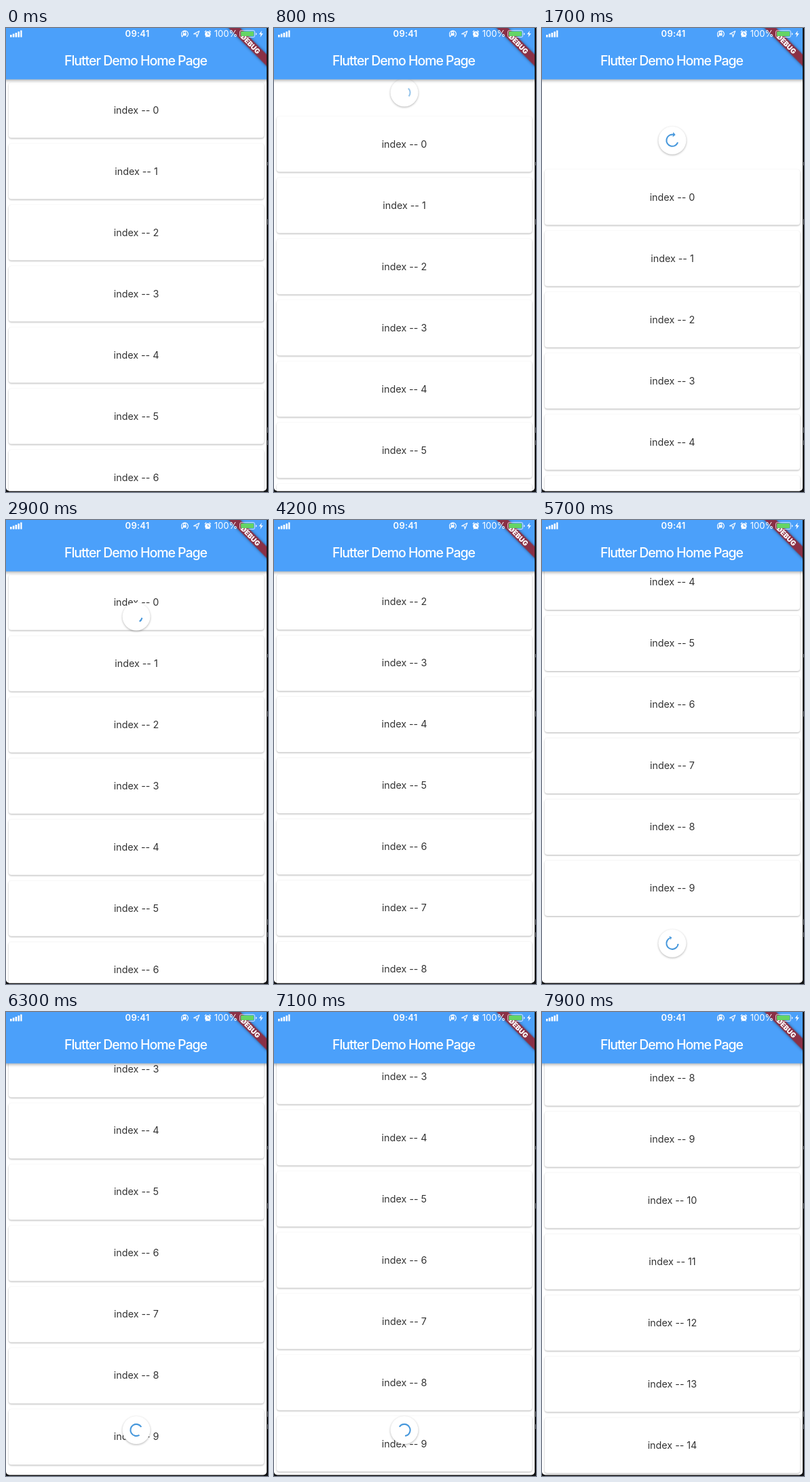
Recreate the animation shown at these times as an HTML page. Size 386 px wide and 682 px high, loop 8000 ms.

```html
<!DOCTYPE html>
<html lang="en">
<head>
<meta charset="utf-8">
<title>Pull to refresh</title>
<style>
  html, body { margin: 0; width: 100%; height: 100%; overflow: hidden; background: #121315; }
  svg { display: block; width: 386px; height: 682px; }
  text { font-family: Inter, "Open Sans", sans-serif; text-anchor: middle; font-feature-settings: "calt" 0; }
  .card rect { fill: #fff; filter: drop-shadow(0 1px 1px rgba(0,0,0,.3)); }
  .card text { font-size: 14.3px; fill: #333; }
  .bar { fill: #4ba0fa; filter: drop-shadow(0 2px 2px rgba(0,0,0,.3)); }
  .title { font-size: 19.5px; font-weight: 500; letter-spacing: -1.02px; fill: #fff; }
  .disc { fill: #fff; filter: drop-shadow(0 1px 1.5px rgba(0,0,0,.3)); }
  .band { fill: #8a3046; filter: drop-shadow(0 0 2px rgba(0,0,0,.45)); }
  .debug { font-size: 10.2px; font-weight: 900; fill: #fff; }
  .status { fill: #fff; font-size: 13px; }
  .line { fill: none; stroke: #fff; stroke-width: 1.1; }
</style>
</head>
<body>
<svg viewBox="0 0 386 682">
  <defs>
    <clipPath id="screen"><rect x="0" y="-10" width="384" height="690.5" rx="5"/></clipPath>
  </defs>
  <rect width="386" height="682" fill="#121315"/>
  <path d="M385.5 197v5M385.5 281v8M385.5 587v8M385.5 606v7" stroke="#77797c"/>
  <g clip-path="url(#screen)">
    <rect width="384" height="682" fill="#fff"/>
    <g id="list"></g>
    <g id="spinner">
      <circle class="disc" r="20.5"/>
      <g id="ink" stroke="#4798dc" fill="#4798dc">
        <path id="arc" fill="none" stroke-width="2.1"/>
        <path id="head" stroke="none"/>
      </g>
    </g>
    <rect class="bar" x="-6" y="-6" width="396" height="81.5"/>
    <text class="title" x="191" y="54.5">Flutter Demo Home Page</text>
    <g transform="translate(384 0) rotate(45)">
      <rect class="band" x="-45" y="27.5" width="90" height="12"/>
      <text class="debug" x="0" y="37.2">DEBUG</text>
    </g>
    <g class="status">
      <path d="M6 10h2.6v3.5H6zM9.8 8.5h2.6v5H9.8zM13.6 7h2.6v6.5h-2.6zM17.4 5.3H20v8.2h-2.6zM21.2 3.5h2.3v10h-2.3z"/>
      <text x="193.500" y="13.300" font-weight="600" letter-spacing=".2">09:41</text>
      <path class="line" d="M259.500 11.800a4.900 4.900 0 1 1 6.500 1.200M261.500 7.500v-1a1.600 1.600 0 0 1 3.200 0v1"/>
      <path d="M260.600 7.500h5v3.700h-5zM258 11l3.500 .4-2.300 2.300z"/>
      <path class="line" d="M276.500 8.700l8.300-4.200-3.600 8.700-.6-4.200z" stroke-linejoin="round"/>
      <circle cx="297.300" cy="9" r="4.300"/>
      <path class="line" d="M292.800 6l2.300-2.300M301.800 6l-2.300-2.300M294 13.500l1.200-1.400M300.600 13.500l-1.200-1.400"/>
      <path d="M297.300 6.400v2.800h2.300" fill="none" stroke="#4ba0fa"/>
      <text x="324" y="13.200">100%</text>
      <rect class="line" x="344.500" y="3.600" width="22" height="10" rx="2.300" style="stroke-width:1;stroke-opacity:.75"/>
      <rect x="346" y="5.100" width="19" height="7" rx="1" fill="#65d465"/>
      <path d="M368 7v3.500q1.400-.4 1.400-1.750T368 7z"/>
      <path d="M376.800 4l-4 5.300h2.600l-.9 4.400 4.200-5.600H376z"/>
    </g>
  </g>
</svg>
<script>
const LOOP = 8000, STEP = 100;
const ITEM = 90, TOP_END = 0, FIRST_END = -296, LAST_END = -745;
const SNAP = 180, LOAD = 1000, FADE = 200;
const topPull = { release: 2320, end: TOP_END, side: 1 };
const bottomPull = { release: 6010, end: FIRST_END, side: -1 };

const $ = id => document.getElementById(id);
const clamp = (v, lo = 0, hi = 1) => Math.min(hi, Math.max(lo, v));
const mix = (a, b, p) => a + (b - a) * p;
const rad = deg => deg * Math.PI / 180;

function addCard(i) {
  const y = 80 + i * ITEM;
  return `<g class="card"><rect x="4" y="${y}" width="376" height="81.500" rx="4"/>` +
    `<text x="192" y="${y + 45.5}">index -- ${i}</text></g>`;
}
$('list').innerHTML = Array.from({ length: 15 }, (_, i) => addCard(i)).join('');
const cards = [...$('list').children];

// cubic-bezier(.4, 0, .2, 1)
function fastOutSlowIn(x) {
  let lo = 0, hi = 1;
  for (let i = 0; i < 20; i++) {
    const s = (lo + hi) / 2, r = 1 - s;
    if (1.2 * r * r * s + .6 * r * s * s + s * s * s < x) lo = s; else hi = s;
  }
  return 3 * (1 - lo) * lo * lo + lo ** 3;
}

// Finger and fling positions: [time, offset]
const dragKeys = [
  [0, 0], [250, 0], [800, 50], [1300, 96], [1700, 128], [2000, 136], [2320, 136]
];
const pushKeys = [
  [5000, 0], [5250, 32], [5500, 68], [5750, 100], [5900, 114], [6010, 115]
];

function follow(keys, t) {
  if (t <= keys[0][0]) return keys[0][1];
  for (let i = 1; i < keys.length; i++) {
    const [t0, a] = keys[i - 1], [t1, b] = keys[i];
    if (t <= t1) return mix(a, b, (t - t0) / (t1 - t0));
  }
  return keys[keys.length - 1][1];
}

function spring(ms) {
  const k = 14 * ms / 1000;
  return (1 + k) * Math.exp(-k);
}

function fling(from, to, start, length, t) {
  const p = clamp((t - start) / length);
  const ease = p < .15 ? p * p / .15 * 1.15 : 1 - (1 - p) ** 2.6 * (1 - .1725) / .85 ** 2.6;
  return mix(from, to, ease);
}

function overscroll(keys, pull, t) {
  return t <= pull.release ? follow(keys, t) : follow(keys, pull.release) * spring(t - pull.release);
}

function listOffset(t) {
  if (t < 3700) return overscroll(dragKeys, topPull, t);
  if (t < 5000) return fling(TOP_END, FIRST_END + .7, 3800, 1100, t);
  if (t < 7250) return FIRST_END - overscroll(pushKeys, bottomPull, t);
  return fling(FIRST_END, LAST_END, 7250, 720, t);
}

const polar = (r, a) => [r * Math.cos(a), r * Math.sin(a)];

function drawArc(u, headScale) {
  const turn = Math.floor(u), v = u - turn;
  const front = fastOutSlowIn(clamp(v * 2)), back = fastOutSlowIn(clamp(v * 2 - 1));
  const start = rad(-90 + back * 270 + v * 306 - turn * 144);
  const sweep = Math.max(rad((front - back) * 270), .01);
  const end = start + sweep, r = 8.6;
  $('arc').setAttribute('d',
    `M${polar(r, start)}A${r} ${r} 0 ${sweep > Math.PI ? 1 : 0} 1 ${polar(r, end)}`);
  const size = 3.9 * headScale, [x, y] = polar(r, end);
  const tip = [x - Math.sin(end) * size, y + Math.cos(end) * size];
  $('head').setAttribute('d',
    `M${polar(r - size, end)}L${polar(r + size, end)}L${tip}Z`);
}

function drawSpinner(pull, keys, t) {
  const loadStart = pull.release + SNAP, loadEnd = loadStart + LOAD;
  const drag = follow(keys, Math.min(t, pull.release));
  const fullDrag = pull.side > 0 ? 133 : 113;
  const part = clamp(drag / fullDrag);
  const scale = 1 - clamp((t - loadEnd) / FADE);
  const visible = drag > 0 && scale > 0;
  $('spinner').style.display = visible ? '' : 'none';
  if (!visible) return;

  const depth = mix(50 + .9 * drag, 142, clamp((t - pull.release) / SNAP));
  const y = pull.side > 0 ? depth : 756.5 - depth;
  $('spinner').setAttribute('transform', `translate(192 ${y}) scale(${scale})`);
  $('ink').setAttribute('opacity', clamp(part * 1.5));
  const loading = t >= loadStart;
  drawArc(.375 * part + (loading ? (t - loadStart) / 1000 : 0),
    loading ? 0 : clamp((part - .3) / .7));
}

function render(t) {
  const offset = listOffset(t);
  const count = t < bottomPull.release + SNAP + LOAD ? 10 : 15;
  cards.forEach((card, i) => {
    const y = 80 + i * ITEM + offset;
    card.style.display = i < count && y > -20 && y < 690 ? '' : 'none';
  });
  $('list').setAttribute('transform', `translate(0 ${offset.toFixed(2)})`);
  if (t < 4500) drawSpinner(topPull, dragKeys, t);
  else drawSpinner(bottomPull, pushKeys, t);
}

const origin = performance.now();
function tick() {
  const t = (performance.now() - origin) % LOOP;
  render(Math.floor(t / STEP) * STEP);
  requestAnimationFrame(tick);
}
tick();
</script>
</body>
</html>
```
